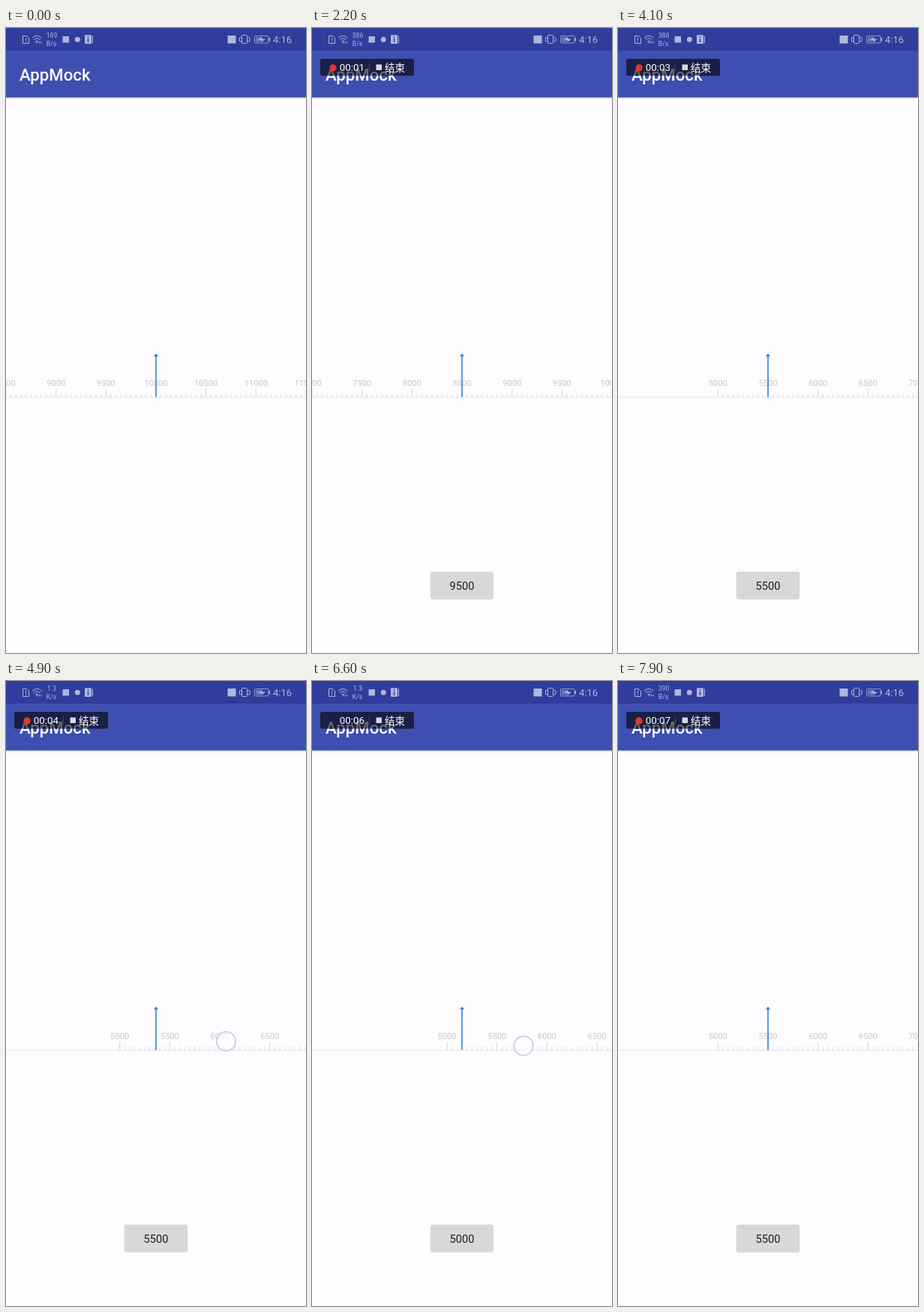
Write an HTML page that moves like this. It is 400 by 831 pixels and loops after 8000 ms.

```html
<!DOCTYPE html>
<html lang="en">
<head>
<meta charset="utf-8">
<title>Ruler picker</title>
<style>
  html, body { margin: 0; width: 100%; height: 100%; overflow: hidden; background: #fefcff; }
  svg { display: block; width: 400px; height: 831px; font-family: Roboto, "Noto Sans CJK SC", "Noto Sans CJK", sans-serif; }
  .mid { text-anchor: middle; }
  .status { fill: #b0b6de; }
  .line { fill: none; stroke: #b0b6de; }
  .cut { fill: none; stroke: #303d9c; stroke-width: 1.5; }
</style>
</head>
<body>
<svg viewBox="0 0 400 831">
  <defs>
    <linearGradient id="shade" x2="0" y2="1">
      <stop stop-color="#dfe0ec"/>
      <stop offset="1" stop-color="#fefcff"/>
    </linearGradient>
  </defs>
  <rect width="400" height="831" fill="#fefcff"/>
  <rect y="92" width="400" height="4" fill="url(#shade)"/>
  <rect y="29" width="400" height="63.400" fill="#3e4fb1"/>
  <rect width="400" height="30" fill="#303d9c"/>

  <!-- status bar, left -->
  <path class="line" d="M22.500 10.500h5l3 3v7h-8zM26.500 13v3.500M26.500 17.500v1.500"/>
  <path class="line" d="M35 13.200q6.300-5.600 12.600 0M37.200 15.600q4.100-3.500 8.200 0M39.300 17.800q2-1.600 4 0"/>
  <circle class="status" cx="41.300" cy="19.300" r="1"/>
  <path class="line" d="M44.500 18v2.500M46.800 18v2.500"/>
  <g class="status mid" font-size="8.600">
    <text id="rate" x="61" y="12.500"></text>
    <text id="unit" x="60.500" y="24"></text>
  </g>
  <rect class="status" x="75.500" y="11" width="8.500" height="8.500"/>
  <circle class="status" cx="95.300" cy="15.200" r="3.500"/>
  <rect class="status" x="105" y="9.300" width="9" height="11.700" rx="1"/>
  <path class="line" d="M115.500 10.500v9.500"/>
  <path class="cut" d="M109.500 11v1.800M109.500 14v5"/>

  <!-- status bar, right -->
  <rect class="status" x="295.500" y="10" width="11" height="10.500"/>
  <rect class="line" x="314.500" y="9.500" width="7" height="11" rx="1"/>
  <path class="line" d="M311.500 12.500v5.500M313.200 11.500v2M313.200 17v2M323.300 11.500v2M323.300 17v2M325 12.500v5.500"/>
  <rect class="line" x="331.500" y="10.500" width="18.500" height="9.500" rx="1" opacity=".75"/>
  <rect class="status" x="333" y="12" width="9" height="6.500" opacity=".45"/>
  <path class="status" d="M336 15.600l5-3.200v2h5l-5 4v-2.200zM350.500 13h1.500v4.500h-1.500z"/>
  <text class="status" x="356" y="19.800" font-size="13">4:16</text>

  <text x="18" y="69.500" font-size="22.200" font-weight="500" fill="#fff">AppMock</text>

  <g id="recorder">
    <rect x="11" y="41" width="125" height="22.500" rx="2.500" fill="#000" fill-opacity=".6"/>
    <circle id="dot" cx="28" cy="53" r="4.700" fill="#e5352c"/>
    <path d="M76.500 47v11" stroke="#fff" stroke-opacity=".15"/>
    <rect x="85.500" y="48.500" width="7.500" height="7.500" fill="#d9d9dc"/>
    <g font-size="13.400" fill="#fff">
      <text id="clock" x="36.800" y="57.300"></text>
      <text x="97" y="57.600">结束</text>
    </g>
  </g>

  <path d="M0 491h400" stroke="#e4e2e7" stroke-width="1.200"/>
  <g id="ruler" class="mid" font-size="11.100" fill="#c9c7cb">
    <path id="minor" stroke="#dad8dd"/>
    <path id="major" stroke="#d4d2d7"/>
  </g>
  <path d="M200 435v55.500" stroke="#4a8edb" stroke-width="1.800"/>
  <path d="M200 433l3.200 3.600h-6.400z" fill="#2f76e0"/>

  <circle id="touch" r="12.700" fill="#fff" fill-opacity=".55" stroke="#cbc9e2" stroke-width="1.700"/>

  <g id="toast">
    <rect x="157.700" y="722.800" width="84.500" height="37" rx="3.500" fill="#d9d7da"/>
    <text id="message" class="mid" x="200" y="747.200" font-size="14.600" fill="#1f1e21"></text>
  </g>
</svg>
<script>
const LOOP = 8000, STEP = 100;
const FIRST = 10000, MIN = 5000, MAX = 12500, MINOR = 50, MAJOR = 500;
const PX = 66.667 / MAJOR;
const REC_START = 400, RATE_EVERY = 3000, RATE_SHIFT = 1700;
const RATES = ["189 B/s", "386 B/s", "1.3 K/s", "390 B/s"];

// The finger drags from down to up, then the ruler snaps until rest;
// x and y are where the finger lifts.
const swipes = [
  { down: 550, up: 1000, rest: 1200, drag: 9560, snap: 9500, x: 290, y: 468 },
  { down: 1500, up: 1900, rest: 2200, drag: 8700, snap: 8500, x: 327, y: 468 },
  { down: 2400, up: 2950, rest: 3900, drag: 6800, snap: 5500, x: 349, y: 462 },
  { down: 4300, up: 5600, rest: 5900, drag: 5200, snap: 5000, x: 315, y: 479 },
  { down: 6200, up: 7200, rest: 7500, drag: 5375, snap: 5500, x: 252, y: 485 }
];

const el = id => document.getElementById(id);
const clamp = x => Math.min(1, Math.max(0, x));
const progress = (t, a, b) => clamp((t - a) / (b - a));
const easeOut = p => 1 - (1 - p) ** 2;

function valueAt(t) {
  let value = FIRST;
  for (const s of swipes) {
    if (t < s.down) break;
    value += (s.drag - value) * progress(t, s.down, s.up);
    value += (s.snap - value) * easeOut(progress(t, s.up, s.rest));
  }
  return value;
}

function buildRuler() {
  let minor = "", major = "";
  for (let v = MIN; v <= MAX; v += MINOR) {
    const x = ((v - MIN) * PX).toFixed(2);
    if (v % MAJOR) {
      minor += `M${x} 486.300v4.200`;
      continue;
    }
    major += `M${x} 480v10.500`;
    const label = document.createElementNS("http://www.w3.org/2000/svg", "text");
    label.setAttribute("x", x);
    label.setAttribute("y", 476);
    label.textContent = v;
    el("ruler").append(label);
  }
  el("minor").setAttribute("d", minor);
  el("major").setAttribute("d", major);
}

function drawTouch(t) {
  const s = swipes.findLast(s => s.down <= t);
  const fade = s ? 1 - progress(t, s.up, s.up + 170) : 0;
  el("touch").style.opacity = fade;
  if (!fade) return;
  const held = valueAt(Math.min(t, s.up));
  el("touch").setAttribute("cx", s.x - (held - s.drag) * PX);
  el("touch").setAttribute("cy", s.y);
}

function drawToast(t) {
  const s = swipes.findLast(s => s.rest + STEP <= t);
  el("toast").style.opacity = s ? 1 : 0;
  el("message").textContent = s ? s.snap : "";
}

function drawStatus(t) {
  const [rate, unit] = RATES[Math.floor((t + RATE_SHIFT) / RATE_EVERY)].split(" ");
  el("rate").textContent = rate;
  el("unit").textContent = unit;

  const rec = t - REC_START;
  el("recorder").style.opacity = clamp(t / 200);
  el("clock").textContent = "00:0" + Math.max(0, Math.floor(rec / 1000));
  el("dot").style.opacity = rec < 0 || rec % 1000 >= 500 ? 1 : 0;
}

function tick() {
  const now = performance.now() % LOOP;
  const t = Math.floor(now / STEP) * STEP;
  el("ruler").setAttribute("transform", `translate(${200 - (valueAt(t) - MIN) * PX} 0)`);
  drawTouch(t);
  drawToast(t);
  drawStatus(t);
  requestAnimationFrame(tick);
}

buildRuler();
tick();
</script>
</body>
</html>
```
